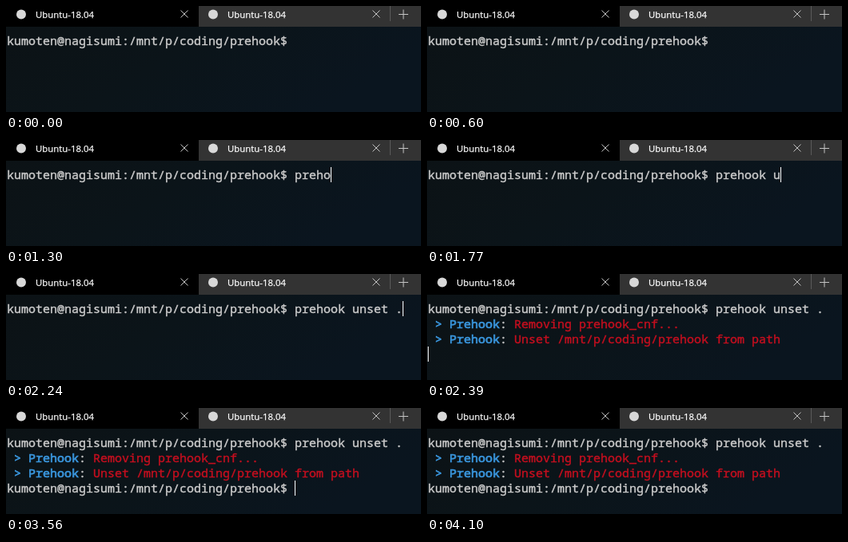
Write an HTML page that moves like this. It is 519 by 133 pixels and loops after 4570 ms.

```html
<!DOCTYPE html>
<html lang="en">
<head>
<meta charset="utf-8">
<title>Terminal</title>
<style>
  html, body { margin: 0; width: 100%; height: 100%; overflow: hidden; background: #0c1216; }
  svg { display: block; width: 519px; height: 133px; }
  text { white-space: pre; }
  .tab { font: 11.4px "Open Sans", "Noto Sans", sans-serif; fill: #fff; stroke: #fff; stroke-width: 0.25px; }
  .term {
    font: 500 15px "Noto Sans Mono", "Liberation Mono", monospace;
    font-variant-ligatures: none;
    fill: #ccc; stroke: #ccc; stroke-width: 0.4px;
  }
  .blue { fill: #3a96dd; stroke: #3a96dd; stroke-width: 0.7px; }
  .red { fill: #c50f1f; stroke: #c50f1f; }
  .icon { stroke: #c4c4c4; fill: none; }
</style>
</head>
<body>
<svg viewBox="0 0 519 133" xmlns="http://www.w3.org/2000/svg">
  <defs>
    <linearGradient id="bg" x1="0" y1="0" x2="1" y2="0.4">
      <stop offset="0" stop-color="#0c1215"/>
      <stop offset="0.5" stop-color="#0b1419"/>
      <stop offset="1" stop-color="#0a151f"/>
    </linearGradient>
    <g id="tab">
      <circle cx="19" cy="10.5" r="6" fill="#d8d8d8"/>
      <text class="tab" x="37" y="15">Ubuntu-18.04</text>
      <path class="icon" d="M218.5 5.5l9 9m0-9l-9 9"/>
    </g>
  </defs>
  <rect width="519" height="133" fill="url(#bg)"/>
  <rect width="519" height="26" fill="#333"/>
  <rect width="241" height="26"/>
  <use href="#tab"/>
  <use href="#tab" x="240"/>
  <path d="M480.5 0v19" stroke="#5a5a5a"/>
  <path class="icon" d="M491 10.5h12m-6-6v12"/>
  <g id="lines" class="term"></g>
  <rect id="cursor" width="1" height="19" fill="#fff"/>
</svg>
<script>
const LOOP = 4570, CELL = 9, ROW = 19, LEFT = 1, TOP = 34;
const PROMPT = "kumoten@nagisumi:/mnt/p/coding/prehook$ ";
const COMMAND = "prehook unset .";
const RUN = 2390, DONE = 2700;

// [time, characters typed so far]
const KEYS = [
  [910, 1], [990, 2], [1070, 3], [1140, 4], [1300, 5], [1460, 6],
  [1620, 7], [1700, 8], [1770, 9], [1850, 10], [1930, 12], [2000, 13],
  [2080, 14], [2240, 15]
];
// Cursor toggles, starting hidden
const BLINKS = [130, 600, 910, 3010, 3560, 4100];

const group = document.getElementById("lines");
const cursor = document.getElementById("cursor");

function addText(row, col, str, cls) {
  const el = document.createElementNS("http://www.w3.org/2000/svg", "text");
  el.setAttribute("x", LEFT + col * CELL);
  el.setAttribute("y", TOP + row * ROW + 15);
  if (cls) el.setAttribute("class", cls);
  el.textContent = str;
  group.append(el);
  return el;
}

function addLog(row, message) {
  return [
    addText(row, 1, "> Prehook", "blue"),
    addText(row, 10, ":"),
    addText(row, 12, message, "red")
  ];
}

addText(0, 0, PROMPT);
const typed = addText(0, PROMPT.length, "");
const output = [
  ...addLog(1, "Removing prehook_cnf..."),
  ...addLog(2, "Unset /mnt/p/coding/prehook from path")
];
const nextPrompt = addText(3, 0, PROMPT);

const show = (el, on) => el.setAttribute("visibility", on ? "visible" : "hidden");

function render(t) {
  let count = 0;
  for (const [at, n] of KEYS) if (t >= at) count = n;
  typed.textContent = COMMAND.slice(0, count);

  output.forEach(el => show(el, t >= RUN));
  show(nextPrompt, t >= DONE);

  const row = t >= RUN ? 3 : 0;
  const col = t < RUN ? PROMPT.length + count : t < DONE ? 0 : PROMPT.length;
  cursor.setAttribute("x", LEFT + col * CELL);
  cursor.setAttribute("y", TOP + row * ROW);
  show(cursor, BLINKS.filter(at => t >= at).length % 2 === 1);
}

const start = performance.now();
function tick() {
  render((performance.now() - start) % LOOP);
  requestAnimationFrame(tick);
}
render(0);
requestAnimationFrame(tick);
</script>
</body>
</html>
```
